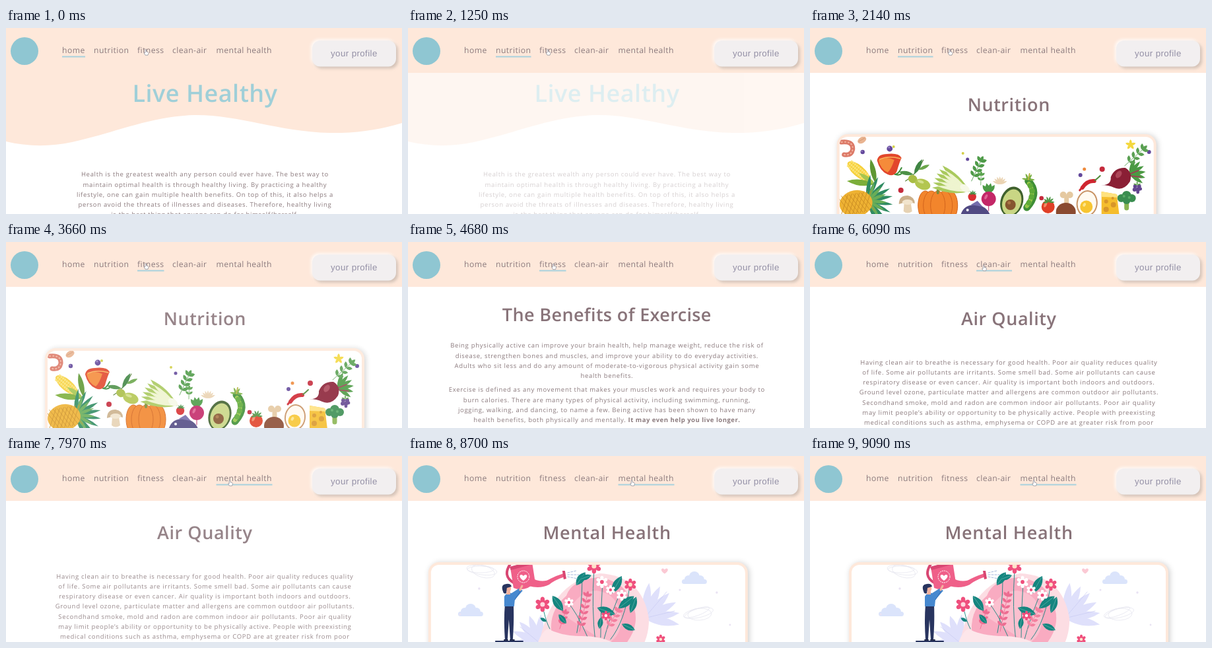
Write an HTML page that moves like this. It is 600x282 px and loops after 9.31 s.

```html
<!DOCTYPE html>
<html lang="en">
<head>
<meta charset="utf-8">
<title>Live Healthy</title>
<style>
html, body { margin: 0; width: 100%; height: 100%; overflow: hidden; background: #fff; }
svg { display: block; width: 600px; height: 282px; }
text { font-family: "Open Sans", "Noto Sans", sans-serif; fill: #8b7a7d; text-rendering: geometricPrecision; white-space: pre; }
.title { font-size: 27px; font-weight: 600; fill: #887379; text-anchor: middle; }
.copy { font-size: 9.5px; letter-spacing: .69px; text-anchor: middle; }
.nav { font-size: 12.2px; letter-spacing: .42px; }
.btn { font: 13.33px "Liberation Sans", Arial, sans-serif; letter-spacing: .4px; fill: #9490a6; }
.btnbox { filter: drop-shadow(3px 3px 2px #b8a59a99) drop-shadow(-2px -2px 2px #fffc); }
.card { filter: drop-shadow(2px 1px 4px #0003); }
</style>
</head>
<body>
<svg id="stage" viewBox="0 0 600 282"></svg>
<script>
const LOOP = 9310;
const PEACH = '#fee8da';

// drawing helpers
const oval = (x, y, rx, ry, fill, rot = 0, more = '') =>
  `<ellipse cx="${x}" cy="${y}" rx="${rx}" ry="${ry}" fill="${fill}" transform="rotate(${rot} ${x} ${y})" ${more}/>`;
const dot = (x, y, r, fill) => oval(x, y, r, r, fill);
const dots = (list, fill) => list.map(([x, y, r]) => dot(x, y, r, fill)).join('');
const shape = (d, fill) => `<path d="${d}" fill="${fill}"/>`;
const line = (d, color, w = 1, more = '') =>
  `<path d="${d}" fill="none" stroke="${color}" stroke-width="${w}" stroke-linecap="round" ${more}/>`;
const group = (x, y, rot, body) => `<g transform="translate(${x} ${y}) rotate(${rot})">${body}</g>`;
const leaf = (x, y, len, w, rot, fill) =>
  group(x, y, rot, shape(`M0 0Q${len / 2} ${-w} ${len} 0Q${len / 2} ${w} 0 0`, fill));
const veined = (x, y, len, w, rot, fill, vein) =>
  leaf(x, y, len, w, rot, fill) + group(x, y, rot, line(`M1 0H${len - 2}`, vein, .5));
const fan = (x, y, n, len, w, from, to, fill) =>
  Array.from({ length: n }, (_, i) => leaf(x, y, len, w, from + (to - from) * i / (n - 1), fill)).join('');

function sprig(x, y, rot, n, gap, size, fill) {
  let s = line(`M0 0H${n * gap}`, fill, .8);
  for (let i = 1; i <= n; i++)
    s += leaf(i * gap, 0, size, size * .5, -50, fill) + leaf(i * gap, 0, size, size * .5, 50, fill);
  return group(x, y, rot, s + leaf(n * gap, 0, size, size * .5, 0, fill));
}

function flower(x, y, r, fill, heart) {
  let s = '';
  for (let i = 0; i < 6; i++) s += oval(0, -r * .62, r * .3, r * .42, fill, 0).replace('rotate(0 0 ' + -r * .62 + ')', `rotate(${i * 60})`);
  return group(x, y, 0, s + dot(0, 0, r * .32, heart));
}

const title = (x, y, ls, text) => `<text class="title" x="${x}" y="${y}" letter-spacing="${ls}">${text}</text>`;
const copy = (ys, lines) => lines.map((s, i) => `<text class="copy" x="301.4" y="${ys[i]}">${s}</text>`).join('');
const rows = (y, n, gap) => Array.from({ length: n }, (_, i) => y + i * gap);

const card = (id, art) => `
  <rect class="card" x="59" y="161" width="484" height="180" rx="16" fill="${PEACH}"/>
  <clipPath id="${id}"><rect x="63" y="165" width="476" height="172" rx="12"/></clipPath>
  <rect x="63" y="165" width="476" height="172" rx="12" fill="#fff"/>
  <g clip-path="url(#${id})">${art}</g>`;

function corn() {
  let s = oval(0, 0, 21, 8.5, '#f6cf3a');
  for (let i = -5; i <= 4; i++) for (let j = -1; j <= 1; j++) s += oval(i * 3.5, j * 4.4, 1.5, 1.8, '#fbe477');
  return group(92, 217, 40, s) + leaf(116, 237, 42, 9, 187, '#7cae3a') + leaf(118, 236, 38, 8, 258, '#5f9733')
    + leaf(117, 237, 30, 7, 215, '#a5c651');
}

function pineapple() {
  let s = oval(0, 0, 25, 20, '#eeb233');
  for (let i = -3; i <= 3; i++)
    s += line(`M${i * 6 - 8} -15L${i * 6 + 8} 15M${i * 6 + 8} -15L${i * 6 - 8} 15`, '#c98a22', .8);
  return fan(104, 262, 9, 40, 6, -82, 62, '#2f8b62') + fan(106, 262, 6, 29, 5, -70, 55, '#69ad57')
    + group(88, 266, -10, s);
}

const pumpkin = () => [[-19, 11], [19, 11], [-10, 12], [10, 12], [0, 11]]
  .map(([dx, r]) => oval(212 + dx, 269, r, 22, '#f2852c', 0, 'stroke="#d2641c" stroke-width="1"')).join('')
  + line('M212 250Q211 243 218 241', '#7a8b38', 4);

const food = () =>
  line('M66 173Q84 171 83 184Q81 194 70 192', '#dc7a68', 7) + line('M66 173Q84 171 83 184Q81 194 70 192', '#f3b3a0', 2, 'stroke-dasharray="1 4"')
  + oval(97, 170, 7, 4.6, '#e9b491', -30) + line('M92 172L101 167', '#c98d69', .7)
  + dots([[98, 188, 3.2], [139, 183, 4.4], [257, 199, 2.5], [428, 223, 3], [532, 188, 3]], '#63489b')
  + dots([[138, 181, 1.5], [97, 187, 1]], '#9b86c6')
  + dots([[250, 190, 2], [145, 180, 2]], '#d3cf48') + dots([[156, 246, 4], [461, 214, 4], [369, 258, 3.3]], '#c52b3c')
  + dots([[434, 214, 2.5]], '#ee8a3c') + corn() + pineapple()
  // pepper
  + shape('M120 201Q121 191 135 191Q153 189 157 197Q154 203 150 217Q146 226 136 222Q124 217 120 201', '#e2472c')
  + shape('M122 200Q134 194 146 200Q141 215 136 219Q125 214 122 200', '#f58b3a')
  + line('M124 199Q138 193 155 198', '#f9b45d', 1.5) + line('M147 222Q152 222 157 212M148 222Q154 224 158 220', '#3c8d3b', 2)
  // olives
  + line('M163 232Q180 222 190 200', '#567f36', 1.2) + leaf(176, 222, 26, 7, -62, '#3f8543') + leaf(175, 222, 22, 6, 190, '#4d9147')
  + leaf(183, 215, 18, 5, -25, '#6aa64b') + oval(174, 229, 7, 6, '#a9bd45', 20) + oval(189, 237, 12, 8, '#b3c650', 20)
  + oval(186, 233, 5, 2, '#d3df8b', 20)
  // mushroom
  + shape('M161 265H171L173 278Q166 283 160 278Z', '#e6d2b3') + shape('M153 267Q153 254 166 254Q177 256 177 266Q166 262 153 267', '#cbb08b')
  + oval(166, 264, 8, 4, '#f1e4cd') + pumpkin()
  // chicory
  + fan(260, 248, 6, 57, 10, 186, 224, '#a9c95d') + fan(259, 248, 5, 49, 6, 190, 222, '#eef4cf') + oval(253, 243, 8, 5, '#f6f8e6', 35)
  + sprig(263, 232, -65, 4, 8, 10, '#4f9b49') + sprig(277, 238, -88, 2, 7, 7, '#5aa34e')
  // shell, tomato, radish
  + fan(306, 237, 7, 12, 3, 205, 335, '#ead3b2') + dot(264, 256, 6.2, '#d82f31') + fan(265, 252, 5, 6, 2, 190, 350, '#3f8f42')
  + line('M289 267V277', '#b72262', 1) + fan(289, 251, 4, 16, 6, -125, -55, '#4b9a45') + dot(289, 259, 11, '#c32767') + oval(285, 256, 2, 4, '#df6494', 25)
  // fish
  + shape('M247 282Q252 267 270 268Q286 270 291 283V290H247Z', '#514a83') + shape('M262 268L272 262L280 271Z', '#746cab') + dot(257, 276, 2, '#fff')
  // avocado
  + oval(324, 263, 17, 23, '#3f612d', 18) + oval(324, 264, 14, 20, '#c9d684', 18) + dot(322, 268, 8, '#86552f') + dot(320, 265, 2.5, '#a97445')
  // pea pod
  + line('M349 232Q366 250 347 272', '#3f8f36', 11) + line('M350 236Q361 251 347 270', '#94c648', 6)
  + dots([[352, 239, 4], [355, 247, 4.3], [354, 256, 4.3], [350, 265, 4]], '#5eaa37') + fan(349, 230, 4, 10, 3, -170, 0, '#7cb043') + line('M349 230L351 221', '#b4b33f', 2)
  // tomato, drumstick, egg
  + dot(379, 271, 10, '#e04027') + oval(375, 268, 2, 4, '#f28c67', 25) + fan(380, 264, 6, 9, 2.5, 175, 360, '#4b9644')
  + line('M407 275V256', '#e5c9a1', 7) + dots([[402, 253, 5], [412, 253, 5]], '#e5c9a1') + oval(406, 279, 15, 14, '#8a4a30')
  + oval(438, 266, 16, 20, '#c89365', 8) + oval(438, 266, 14, 18, '#fffaf0', 8) + dot(437, 271, 9.5, '#f7c531') + oval(434, 268, 2, 3, '#fde68c', 30)
  // chilli, cheese
  + line('M431 242Q438 231 449 232', '#cf2630', 6) + line('M427 246L433 239', '#cf2630', 3) + line('M450 231Q454 228 458 224', '#508b3a', 2)
  + shape('M460 248L483 252L487 284H460Z', '#f5bd2d') + shape('M460 248L483 252L486 257L460 256Z', '#ffe27e')
  + dots([[467, 263, 3], [478, 268, 4], [467, 275, 4], [477, 258, 2]], '#d8962a')
  // beet
  + fan(502, 221, 6, 25, 6, -70, 35, '#4b9a43') + line('M501 222L516 216M502 224L519 226', '#a73555', 1.4)
  + shape('M459 238Q475 239 474 226Q480 211 496 212Q508 219 503 233Q493 248 479 242Q471 238 459 238', '#8a1f35') + oval(486, 222, 4, 6, '#ad4659', 35)
  // broccoli, berry, star, herbs
  + line('M498 264V273', '#89b451', 7) + dots([[490, 258, 6], [498, 254, 7], [506, 258, 6], [498, 261, 6]], '#3a8d50') + dots([[494, 255, 2], [502, 257, 2]], '#5aac68')
  + dots([[511, 240, 3], [517, 240, 3], [510, 245, 3], [515, 245, 3.3], [519, 244, 2.4], [515, 249, 2.4]], '#62458f') + fan(514, 238, 3, 6, 2, 200, 340, '#5a9e48')
  + fan(504, 177, 5, 8, 4, -90, 198, '#f4d83f') + dot(504, 177, 3.5, '#f4d83f')
  + sprig(495, 209, -42, 4, 9, 10, '#5aa052');

const cloud = (x, y) => dots([[x - 9, y, 6], [x, y - 4, 8], [x + 9, y, 6]], '#dbe4fb') + `<rect x="${x - 19}" y="${y}" width="38" height="7" rx="3.5" fill="#dbe4fb"/>`;
const scribble = (x, y, rot) => [[0, 0, 23, 7], [2, 2, 18, 9], [-2, -1, 20, 5]]
  .map(([dx, dy, rx, ry]) => oval(x + dx, y + dy, rx, ry, 'none', rot + dx * 4, 'stroke="#e4e4ee" stroke-width=".7"')).join('');
const heart = (x, y, s, fill) => group(x, y, 0, shape(`M0 ${s}C${-s * 2} ${-s * .3} ${-s * .8} ${-s * 1.4} 0 ${-s * .4}C${s * .8} ${-s * 1.4} ${s * 2} ${-s * .3} 0 ${s}`, fill));

function garden() {
  const teal = '#15857f', vein = '#7cc2ba', rose = '#ef4f7d', lilac = '#dfe0fb';
  const green = [[283, 196, 24, 11, -55], [263, 235, 28, 12, 235], [289, 187, 18, 8, -20], [337, 208, 30, 12, -60], [347, 231, 30, 12, -38],
    [342, 240, 29, 12, 200], [365, 238, 26, 10, -70], [372, 264, 22, 9, 205], [318, 262, 18, 8, -80], [268, 254, 18, 8, -130]];
  return scribble(140, 173, 8) + scribble(468, 238, -12) + cloud(123, 236) + cloud(462, 187)
    + heart(417, 174, 4.5, '#fbc9d4') + dots([[136, 201, 1.7], [440, 203, 1.5], [496, 207, 1.7], [107, 240, 1.5], [516, 256, 1.4]], '#e9e2f3')
    + fan(386, 246, 6, 54, 12, -82, 10, lilac) + fan(226, 282, 5, 42, 11, 178, 275, lilac)
    + line('M386 246L420 206M386 246L432 235M226 282L198 259', '#c9cbf2', .7)
    // head and planting bed
    + shape('M226 292Q240 192 318 178Q383 181 393 246Q394 270 382 292Z', '#fcdde3')
    + shape('M246 272Q240 236 268 212Q276 188 315 184Q360 188 371 231Q380 262 352 292H262Z', '#f9abc1')
    + shape('M268 244Q282 206 314 204Q348 209 352 247Q350 276 330 284Z', '#fbc0cf')
    + line('M312 282Q306 230 310 172M300 274Q283 235 270 222M325 278Q336 236 352 203M335 278Q357 250 364 198M284 268Q292 228 292 188M320 275Q320 235 323 191', teal, .9)
    + sprig(288, 266, -78, 6, 9, 9, '#ed6c91') + sprig(329, 264, -60, 4, 8, 9, '#f4809f') + sprig(258, 262, -72, 3, 8, 8, '#ed6c91')
    + green.map(g => veined(...g, teal, vein)).join('')
    + shape('M222 292Q229 267 240 262Q259 272 286 273Q320 272 341 284V292Z', '#fde6ea')
    + flower(232, 225, 11, rose, '#ffd9df') + flower(310, 167, 11, rose, '#ffe1c9') + flower(365, 195, 9, rose, '#ffe1c9') + flower(411, 278, 7, rose, '#ffe1c9')
    + flower(322, 191, 9, '#fff', rose) + flower(352, 211, 8, '#fff', rose) + flower(272, 222, 7, '#fff', rose) + flower(335, 203, 7, '#fff', rose) + flower(328, 242, 7, rose, '#fff')
    + line('M234 236Q238 253 243 262', teal, .9) + leaf(238, 251, 11, 5, -150, teal)
    // watering can
    + line('M188 192Q171 182 183 164', '#d84672', 4) + shape('M213 184Q232 194 244 186Q254 181 264 178L266 183Q250 188 242 195Q228 202 211 197Z', '#ef6089')
    + shape('M262 174L266 174L268 186L264 187Z', '#d84672') + shape('M183 168L216 160L221 192Q205 207 188 200Z', '#ef6089')
    + shape('M182 168L216 159L217 164L184 173Z', '#d84672') + oval(203, 183, 9, 9, 'none', 0, 'stroke="#fff" stroke-width="1" stroke-dasharray="2 1"') + heart(203, 184, 5, '#fff')
    + line('M270 177L283 174M270 180H287M270 183L285 186', '#8ea6d5', .8, 'stroke-dasharray="3 2"')
    // gardener
    + shape('M175 225H188Q189 250 187 278H183L181 248L179 278H175Q173 248 175 225', '#28345f') + line('M174 279H179M183 279H189', '#1f2748', 2)
    + shape('M174 213Q178 206 185 208L196 201L202 204L190 218L189 228H174Z', '#4688cf') + line('M190 218L199 204', '#3470b7', 1)
    + line('M198 203L201 197', '#f3b39e', 3) + shape('M178 204H183V210H177Z', '#f3b39e') + oval(180, 201, 4.2, 5, '#f3b39e')
    + shape('M172 205Q168 195 177 194Q184 193 185 198L178 200L177 208Q173 210 172 205', '#28345f')
    + line('M161 281H202', '#28345f', 2);
}

const wave = 'M0 60V172C32 180 68 180 100 173C162 160 218 134 285 132C350 131 412 157 490 159C530 160 568 154 600 144V60Z';

// in/out: start, end, number of steps
const pages = [
  { id: 'home', nav: 0, out: [1090, 1310, 4],
    head: shape(wave, PEACH) + '<text class="title" x="301.5" y="112" letter-spacing=".5" style="font-size:36px;fill:#9fcfd8">Live Healthy</text>',
    body: copy(rows(225.3, 5, 15.2), [
      'Health is the greatest wealth any person could ever have. The best way to',
      'maintain optimal health is through healthy living. By practicing a healthy',
      'lifestyle, one can gain multiple health benefits. On top of this, it also helps a',
      'person avoid the threats of illnesses and diseases. Therefore, healthy living',
      'is the best thing that anyone can do for himself/herself.']) },
  { id: 'nutrition', nav: 1, in: [1990, 2350, 6], out: [3660, 3880, 4], from: 100,
    head: title(301.3, 126.3, .6, 'Nutrition'), body: card('clipA', food()) },
  { id: 'fitness', nav: 2, in: [4040, 4270, 4], out: [5340, 5560, 4],
    head: title(301.3, 119.8, .37, 'The Benefits of Exercise'),
    body: copy([...rows(160.3, 4, 15.2), ...rows(227.4, 4, 15.2)], [
      'Being physically active can improve your brain health, help manage weight, reduce the risk of',
      'disease, strengthen bones and muscles, and improve your ability to do everyday activities.',
      'Adults who sit less and do any amount of moderate-to-vigorous physical activity gain some',
      'health benefits.',
      'Exercise is defined as any movement that makes your muscles work and requires your body to',
      'burn calories. There are many types of physical activity, including swimming, running,',
      'jogging, walking, and dancing, to name a few. Being active has been shown to have many',
      'health benefits, both physically and mentally. <tspan font-weight="700" letter-spacing=".5">It may even help you live longer.</tspan>']) },
  { id: 'air', nav: 3, in: [5720, 6090, 6], out: [7970, 8210, 4], from: 100,
    head: title(301.3, 126.3, .57, 'Air Quality'),
    body: copy(rows(185.8, 7, 15.2), [
      'Having clean air to breathe is necessary for good health. Poor air quality reduces quality',
      'of life. Some air pollutants are irritants. Some smell bad. Some air pollutants can cause',
      'respiratory disease or even cancer. Air quality is important both indoors and outdoors.',
      'Ground level ozone, particulate matter and allergens are common outdoor air pollutants.',
      'Secondhand smoke, mold and radon are common indoor air pollutants. Poor air quality',
      'may limit people’s ability or opportunity to be physically active. People with preexisting',
      'medical conditions such as asthma, emphysema or COPD are at greater risk from poor']) },
  { id: 'mind', nav: 4, in: [8390, 8520, 3], move: [8700, 9090, 6], from: 44,
    head: title(301.6, 126.3, .7, 'Mental Health'), body: card('clipB', garden()) }
];

const links = [['home', 85, 35], ['nutrition', 133, 53.5], ['fitness', 199, 40.5], ['clean-air', 252, 54], ['mental health', 318.5, 85]];

const stage = document.getElementById('stage');
stage.innerHTML = `<rect width="600" height="282" fill="#fff"/>`
  + pages.map(p => `<g id="${p.id}"><g>${p.head}</g><g>${p.body}</g></g>`).join('')
  + `<rect width="600" height="68" fill="${PEACH}"/>`
  + dot(28, 35, 21, '#8fc6d2')
  + links.map(([s, x]) => `<text class="nav" x="${x}" y="38">${s}</text>`).join('')
  + `<rect id="bar" y="42.5" height="2" fill="#a8d2de"/>
  <rect class="btnbox" x="464" y="19" width="127" height="39.5" rx="12" fill="#f2eff0"/>
  <text class="btn" x="492" y="43">your profile</text>
  <g id="cursor" stroke="#8f8f98" stroke-width=".8" stroke-linejoin="round" fill="#fff">
    <path id="arrow" d="M-1.5 -2.5V4L0 2.7L1.2 5L2.2 4.5L1.2 2.3H3Z"/>
    <path id="hand" d="M-1.8 -4Q-.8 -5 0 -4V-1.2L2.7 -.5Q3.6 0 3.3 1.6L2.5 4.2H-1.4L-3.4 1Q-3.2 -.2 -1.8 .8Z"/>
  </g>`;

const el = id => document.getElementById(id);
const nodes = pages.map(p => el(p.id));

function step(t, [a, b, n]) {
  const k = Math.floor((t - a) / (b - a) * (n - 1) + 1.001);
  return Math.max(0, Math.min(n, k)) / n;
}

const moves = [
  [[90, 320, 4], 175, 36], [[2600, 2990, 6], 212, 36.5], [[3150, 3151, 1], 212.5, 37],
  [[4680, 5060, 6], 264, 39.5], [[6520, 7050, 8], 340, 41]
];

function draw(t) {
  let active = 0;
  pages.forEach((p, i) => {
    const shown = p.in ? step(t, p.in) : 1;
    const gone = p.out ? step(t, p.out) : 0;
    if (gone > 0) active = i + 1;
    const fadeIn = Math.min(1, shown * (p.from && !p.move ? 2 : 1.2));
    const alpha = fadeIn * (1 - Math.pow(gone, 1.5));
    nodes[i].setAttribute('opacity', alpha);
    nodes[i].setAttribute('display', alpha > 0 ? 'inline' : 'none');
    const q = p.move ? step(t, p.move) : shown;
    const dx = p.from ? -p.from * Math.pow(1 - q, 2.45) : 0;
    nodes[i].lastElementChild.setAttribute('transform', `translate(${dx} 0)`);
  });

  el('bar').setAttribute('x', links[active][1]);
  el('bar').setAttribute('width', links[active][2]);

  let x = 197, y = 21;
  for (const [span, tx, ty] of moves) {
    const p = step(t, span);
    x += (tx - x) * p;
    y += (ty - y) * p;
  }
  el('cursor').setAttribute('transform', `translate(${x} ${y})`);
  const over = y > 29;
  el('hand').setAttribute('display', over ? 'inline' : 'none');
  el('arrow').setAttribute('display', over ? 'none' : 'inline');
}

function tick() {
  draw(performance.now() % LOOP);
  requestAnimationFrame(tick);
}
tick();
</script>
</body>
</html>
```
